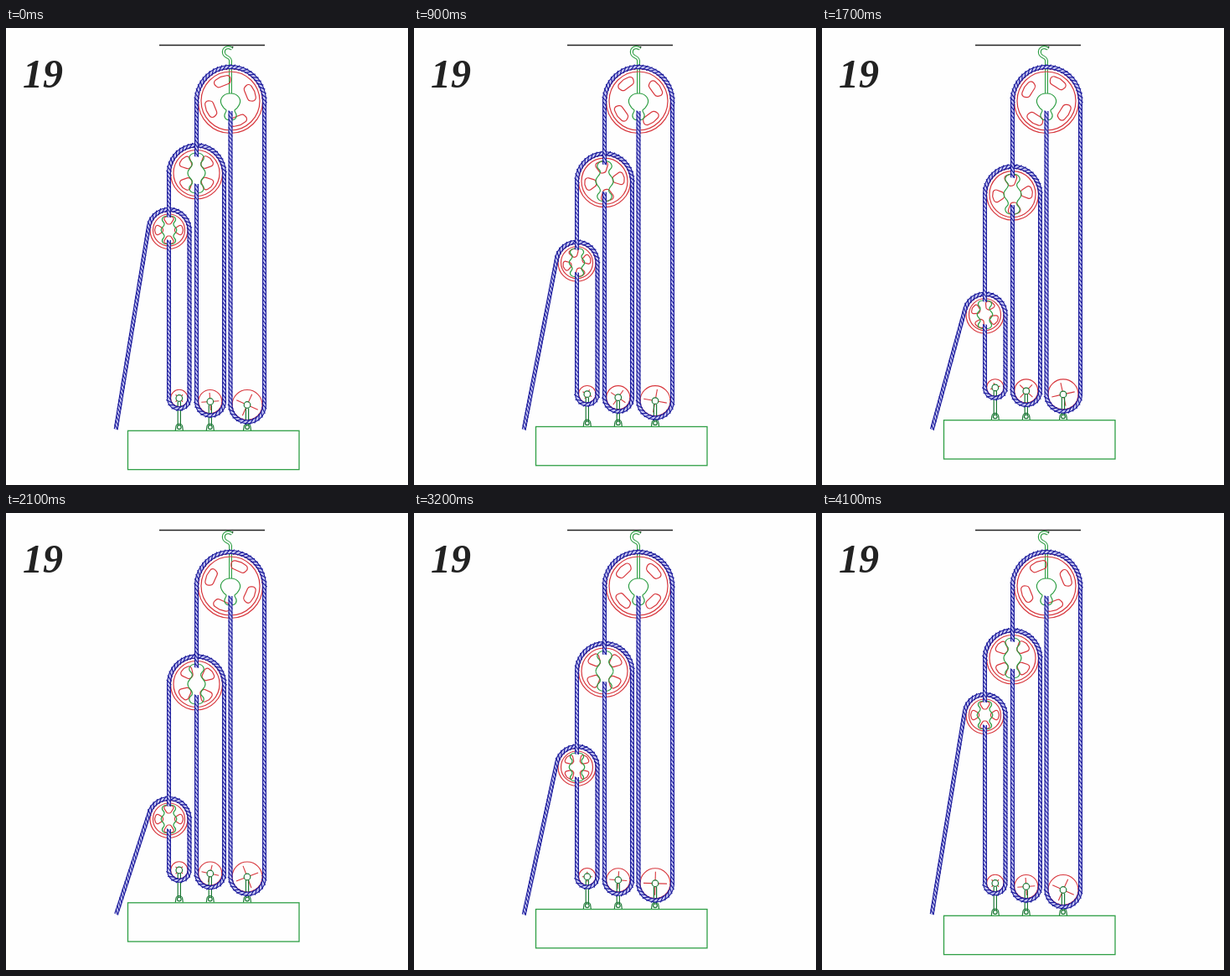
These frames come from a looping animation (480x545 px, 4.4 s). An HTML page with a canvas:

```html
<!DOCTYPE html>
<html lang="en">
<head>
<meta charset="utf-8">
<title>Pulley system 19</title>
<style>
html, body { margin: 0; width: 100%; height: 100%; overflow: hidden; background: #fefefe; }
canvas { display: block; width: 480px; height: 545px; }
.num {
  position: absolute; left: 20px; top: 28px;
  font: italic bold 48px/54px "Liberation Serif", serif; color: #222;
}
</style>
</head>
<body>
<canvas id="stage" width="480" height="545"></canvas>
<div class="num">19</div>
<script>
const c = document.getElementById('stage').getContext('2d');
const RED = '#d8383e', GREEN = '#2f9f45', BLUE = '#1d1d9c', PALE = '#c9c9f4';
const LOOP = 4400, TICK = 100, STEPS = 16, LIFT = 15.5 / STEPS, PITCH = 5;
const rad = Math.PI / 180;

const clamp = n => Math.max(0, Math.min(STEPS, n));

function pen(color, width) {
  c.strokeStyle = color;
  c.lineWidth = width;
}

function ring(x, y, r) {
  c.beginPath();
  c.arc(x, y, r, 0, 7);
  c.stroke();
}

function seg(x1, y1, x2, y2) {
  c.beginPath();
  c.moveTo(x1, y1);
  c.lineTo(x2, y2);
  c.stroke();
}

// Closed outline through the midpoints of its control points.
function blob(pts) {
  const mid = (a, b) => [(a[0] + b[0]) / 2, (a[1] + b[1]) / 2];
  c.beginPath();
  c.moveTo(...mid(pts[pts.length - 1], pts[0]));
  pts.forEach((p, i) => c.quadraticCurveTo(...p, ...mid(p, pts[(i + 1) % pts.length])));
  c.closePath();
  c.stroke();
}

// Symmetric hub plate given as [half width, y] pairs.
function plate(x, y, half) {
  const right = half.map(([w, h]) => [x + w, y + h]);
  const left = half.map(([w, h]) => [x - w, y + h]).reverse();
  pen(GREEN, 1.2);
  blob(right.concat(left));
}

// Sheave with four rounded openings; angles turn anticlockwise.
function sheave(x, y, r, gap, deg, hole) {
  const [r0, w0, r1, w1, round] = hole;
  pen(RED, 1.2);
  ring(x, y, r);
  ring(x, y, r - gap);
  for (let i = 0; i < 4; i++) {
    c.save();
    c.translate(x, y);
    c.rotate((i * 90 - deg) * rad);
    const p = [[r0, -w0], [r1 - 2, -w1], [r1, 0], [r1 - 2, w1], [r0, w0]];
    c.beginPath();
    c.moveTo(r0, 0);
    p.forEach((q, j) => c.arcTo(...q, ...(p[j + 1] || [r0, 0]), round));
    c.closePath();
    c.stroke();
    c.restore();
  }
}

function lowerWheel(x, y, r, deg, tip, load) {
  pen(RED, 1.1);
  ring(x, y, r);
  for (let i = 0; i < 4; i++) {
    const a = (i * 90 - deg) * rad, u = Math.cos(a), v = Math.sin(a);
    seg(x + 3.5 * u, y + 3.5 * v, x + tip * u, y + tip * v);
  }
  pen('#1f7a38', 1.2);
  ring(x, y, 3.8);
  seg(x - 1.6, y + 4, x - 1.6, load - 6);
  seg(x + 1.6, y + 4, x + 1.6, load - 6);
  ring(x, load - 4, 2.3);
  c.beginPath();
  c.moveTo(x - 4.5, load);
  c.lineTo(x - 4, load - 4);
  c.arc(x, load - 4, 4, Math.PI, 0);
  c.lineTo(x + 4.5, load);
  c.stroke();
}

function line(x1, y1, x2, y2) {
  const len = Math.hypot(x2 - x1, y2 - y1), u = (x2 - x1) / len, v = (y2 - y1) / len;
  return { len, reach: 2.3, at: s => [x1 + u * s, y1 + v * s, u, v] };
}

// Arc run anticlockwise from angle a.
function bend(x, y, r, a, sweep) {
  return {
    len: r * sweep, reach: 3,
    at: s => {
      const b = a - s / r, u = Math.cos(b), v = Math.sin(b);
      return [x + r * u, y + r * v, v, -u];
    }
  };
}

function rope(parts) {
  const total = parts.reduce((n, p) => n + p.len, 0);
  const end = Math.floor(total / PITCH) * PITCH;
  const path = new Path2D(), lay = new Path2D();
  let start = 0, next = PITCH / 2;
  parts.forEach((p, i) => {
    const len = Math.min(p.len, end - start);
    for (let s = 0; s < len; s += 2) {
      const [x, y] = p.at(s);
      if (i || s) path.lineTo(x, y); else path.moveTo(x, y);
    }
    path.lineTo(...p.at(len).slice(0, 2));
    for (; next < start + len; next += PITCH) {
      const [x, y, u, v] = p.at(next - start);
      const dx = v * p.reach + u * 3, dy = -u * p.reach + v * 3;
      lay.moveTo(x - dx, y - dy);
      lay.lineTo(x + dx, y + dy);
    }
    start += p.len;
  });
  pen(BLUE, 5);
  c.stroke(path);
  pen(PALE, 2.8);
  c.stroke(path);
  pen(BLUE, 1.2);
  c.stroke(lay);
}

// Rope from a block down round a lower wheel and up to the upper sheave.
function fall(x, from, low, r, up) {
  return [
    line(x, from, x, low),
    bend(x + r, low, r, Math.PI, Math.PI),
    line(x + 2 * r, low, x + 2 * r, up)
  ];
}

function hook() {
  pen('#222', 1.6);
  seg(183, 20.5, 309, 20.5);
  c.beginPath();
  c.arc(268, 22, 2.6, 0, Math.PI);
  c.stroke();
  const bent = new Path2D('M270 25 C265 21 259 24 260 30 C261 36 269 33 268 41 L268 78');
  pen(GREEN, 4);
  c.stroke(bent);
  pen('#fefefe', 1.8);
  c.stroke(bent);
}

function draw(k) {
  const load = 480 - LIFT * k;
  const top = 87, mid = 173 + 2 * LIFT * k, small = 241 + 8 * LIFT * k;
  const lowA = load - 30.5, lowB = load - 34.5, lowC = load - 38.5;

  c.fillStyle = '#fefefe';
  c.fillRect(0, 0, 480, 545);
  hook();

  sheave(268, top, 38.5, 3.5, 22 + 2.74 * k, [20, 8, 31, 12, 4]);
  sheave(227.5, mid, 31, 3.5, 46 + 10.8 * k, [10, 3, 24, 9, 3.5]);
  sheave(194.5, small, 22.5, 3.5, 39.4 * k, [7, 2, 17, 7, 2.5]);
  plate(268, top, [[7, -9], [13, 0], [8, 9], [4, 11], [8, 17], [5, 23]]);
  plate(227.5, mid, [[6, -24], [10, -17], [3, -11], [13, 0], [3, 11], [10, 17], [6, 24]]);
  plate(194.5, small, [[6, -17], [9, -12], [4, -7], [11, 0], [4, 7], [9, 12], [6, 17]]);

  lowerWheel(288, lowA, 18, 2.8 * k - 24, 14, load);
  lowerWheel(243.8, lowB, 14, 10.2 * k - 86, 10.5, load);
  lowerWheel(206.8, lowC, 10.2, 45 + 39.4 * k, 6, load);

  pen(GREEN, 1.3);
  c.strokeRect(145.5, load + 0.3, 204.5, 46.3);

  // Free end hangs on the tangent from a fixed point.
  const ex = 130.8, ey = 481, r = 24.5 / 2;
  const dx = ex - 194.5, dy = ey - small;
  const a = Math.atan2(dy, dx) + Math.acos(2 * r / Math.hypot(dx, dy));
  rope([
    ...fall(194.5, small + 12, lowC, r, small),
    bend(194.5, small, 2 * r, 0, 2 * Math.PI - a),
    line(194.5 + 2 * r * Math.cos(a), small + 2 * r * Math.sin(a), ex, ey)
  ]);
  rope([
    ...fall(227.5, mid + 13, lowB, 16.5, mid),
    bend(227.5, mid, 33, 0, Math.PI),
    line(194.5, mid, 194.5, small - 12)
  ]);
  rope([
    ...fall(268, 99, lowA, 20.25, top),
    bend(268, top, 40.5, 0, Math.PI),
    line(227.5, top, 227.5, mid - 16)
  ]);
}

function frame(now) {
  const n = Math.floor(now % LOOP / TICK);
  draw(clamp(n - 4) - clamp(n - 24));
  requestAnimationFrame(frame);
}
draw(0);
requestAnimationFrame(frame);
</script>
</body>
</html>
```
